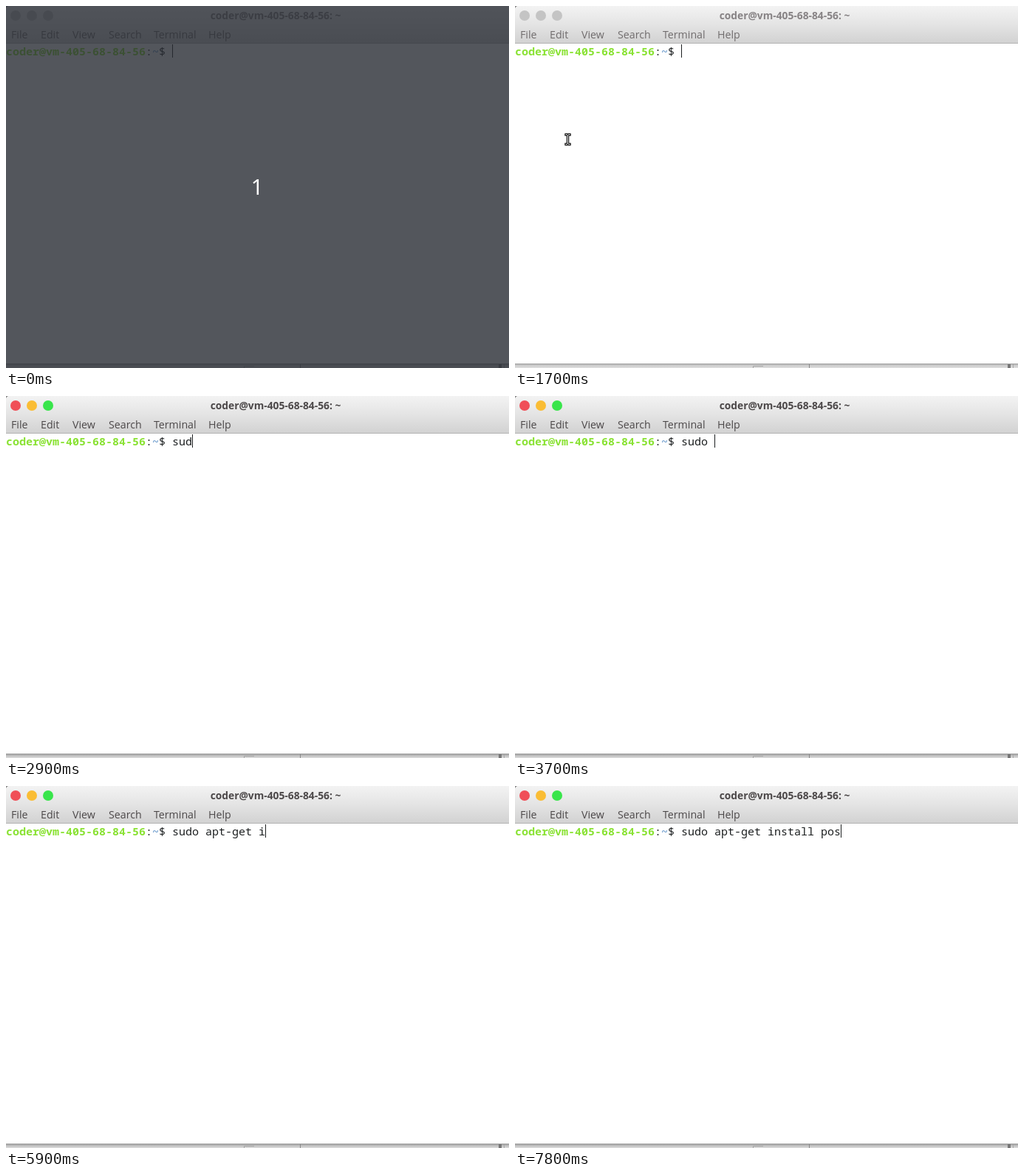
Write an HTML page that moves like this. It is 681 px wide and 491 px high and loops after 8 s.

```html
<!DOCTYPE html>
<html lang="en">
<head>
<meta charset="utf-8">
<title>Terminal session</title>
<style>
  html, body { margin: 0; width: 100%; height: 100%; overflow: hidden; background: #fff; }
  svg { display: block; width: 681px; height: 491px; }
  text { white-space: pre; }
  .ui { font: 14.2px "Open Sans", "Noto Sans", sans-serif; fill: #706c6d; }
  .title { font: bold 13.8px "Open Sans", "Noto Sans", sans-serif; fill: #878385; text-anchor: middle; }
  .mono { font: 15px "Noto Sans Mono", "DejaVu Sans Mono", monospace; fill: #1c1f20; }
  .host { font-weight: bold; fill: #8ae234; }
  .path { fill: #729fcf; font-weight: bold; }
  .button { fill: #c4c4c4; }
  .shadow { opacity: .6; }
  .focused .ui, .focused .title { fill: #4c4849; }
  .focused .close { fill: #f04f58; }
  .focused .minimise { fill: #fabd35; }
  .focused .zoom { fill: #39e54b; }
  .focused .shadow { opacity: 1; }
  .count { font: 29px "Noto Sans", "Open Sans", sans-serif; fill: #fff; text-anchor: middle; }
</style>
</head>
<body>
<svg viewBox="0 0 681 491">
  <defs>
    <linearGradient id="bar" x2="0" y2="1">
      <stop stop-color="#f3f3f3"/>
      <stop offset=".5" stop-color="#e4e4e4"/>
      <stop offset="1" stop-color="#d2d2d2"/>
    </linearGradient>
    <linearGradient id="fade" x2="0" y2="1">
      <stop stop-color="#aaa"/>
      <stop offset="1" stop-color="#dedede"/>
    </linearGradient>
    <path id="beam" d="M-2.5-6.5H-1L0-5.5L1-6.5H2.5M0-5.5V5.5M-2.5 6.5H-1L0 5.5L1 6.5H2.5"
      fill="none" stroke-linecap="square"/>
  </defs>

  <g id="window">
    <rect width="681" height="491" fill="#fff"/>
    <rect width="681" height="50" fill="url(#bar)"/>
    <path d="M0 0H3Q1 1 0 3Z" fill="#888"/>
    <rect y="50" width="681" height="1" fill="#b3b3b3"/>
    <circle class="button close" cx="13" cy="13" r="7"/>
    <circle class="button minimise" cx="35" cy="13" r="7"/>
    <circle class="button zoom" cx="57" cy="13" r="7"/>
    <text class="title" x="365" y="18">coder@vm-405-68-84-56: ~</text>
    <g id="menu"></g>

    <text class="mono host" x="0" y="67">coder@vm-405-68-84-56</text>
    <text class="mono" x="189" y="67">:</text>
    <text class="mono path" x="198" y="67">~</text>
    <text class="mono" x="207" y="67">$</text>
    <text class="mono" id="command" x="225" y="67"></text>
    <rect id="caret" y="52" width="1" height="18" fill="#1c1f20"/>

    <rect y="486" width="681" height="5" fill="#e2e2e2"/>
    <rect class="shadow" y="486" width="681" height="5" fill="url(#fade)"/>
    <rect y="485" width="681" height="1" fill="#999"/>
    <path d="M322.5 491V488.5H336" fill="none" stroke="#a4a4a4"/>
    <path d="M398.5 486V491" stroke="#888"/>
    <path d="M669 486V491" stroke="#777" stroke-width="4"/>
    <path d="M674.5 486V491" stroke="#aaa"/>
  </g>

  <g id="pointer">
    <use href="#beam" stroke="#111" stroke-width="3.4"/>
    <use href="#beam" stroke="#fff" stroke-width="1"/>
  </g>

  <g id="countdown">
    <rect width="681" height="491" fill="#282c34" opacity=".8"/>
    <text class="count" x="340" y="256">1</text>
  </g>
</svg>

<script>
const LOOP = 8000;
const COMMAND = "sudo apt-get install pos";
const CHAR_WIDTH = 9;

// [time in ms, characters typed so far]
const KEYS = [
  [2700, 1], [2800, 2], [2900, 3], [3000, 4], [3700, 5], [4100, 6],
  [4200, 7], [4400, 8], [5100, 10], [5500, 11], [5700, 12], [5900, 14],
  [6000, 15], [6100, 16], [6400, 18], [7200, 20], [7500, 21], [7600, 22], [7800, 24]
];
const CARET_OFF = [[3400, 3600], [6800, 6900]];
const MENU = [["File", 7], ["Edit", 47], ["View", 90], ["Search", 139], ["Terminal", 200], ["Help", 274]];

const byId = id => document.getElementById(id);
const within = (t, start, end) => t >= start && t < end;
const show = (id, visible) => byId(id).setAttribute("visibility", visible ? "visible" : "hidden");

byId("menu").innerHTML = MENU
  .map(([label, x]) => `<text class="ui" x="${x}" y="44">${label}</text>`).join("");

function draw(t) {
  const typed = KEYS.reduce((count, [time, total]) => t >= time ? total : count, 0);
  byId("command").textContent = COMMAND.slice(0, typed);
  byId("caret").setAttribute("x", 225 + CHAR_WIDTH * typed);
  show("caret", !CARET_OFF.some(([start, end]) => within(t, start, end)));

  byId("window").classList.toggle("focused", t >= 1900);
  show("countdown", t < 400);

  show("pointer", within(t, 1700, 2100));
  const step = Math.max(0, Math.floor((t - 1700) / 100));
  byId("pointer").setAttribute("transform", `translate(${71.5 + 4 * step} ${181 + 3 * step})`);
}

let start;
function tick(now) {
  start ??= now;
  draw((now - start) % LOOP);
  requestAnimationFrame(tick);
}
draw(0);
requestAnimationFrame(tick);
</script>
</body>
</html>
```
